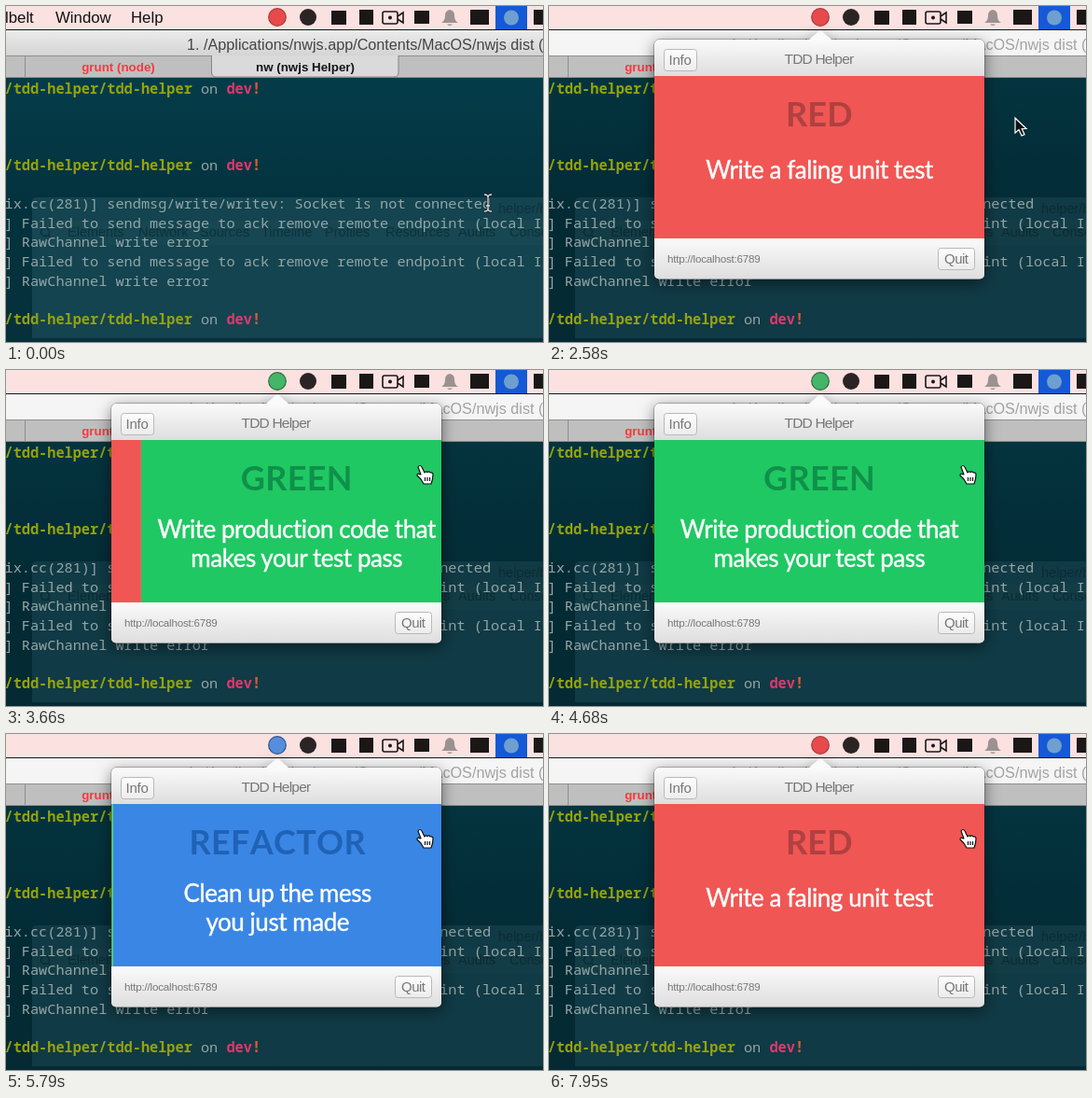
An HTML page that plays this animation: 576x360 px, repeating every 8000 ms.

```html
<!DOCTYPE html>
<html lang="en">
<head>
<meta charset="utf-8">
<title>TDD Helper</title>
<style>
html, body { margin: 0; width: 100%; height: 100%; overflow: hidden; background: #05343f; }
#stage { display: block; width: 576px; height: 360px; font-family: "Liberation Sans", Arial, sans-serif; }
#stage text { white-space: pre; }
.menu { font-size: 16.8px; fill: #111; }
.tab { font-size: 13.35px; font-weight: bold; text-anchor: middle; }
.term { font: 500 15.25px "Noto Sans Mono", "DejaVu Sans Mono", monospace; fill: #94a5a5; }
.path { fill: #95a30c; font-weight: bold; }
.branch { fill: #e0386c; font-weight: bold; }
.bang { fill: #dc5c2f; font-weight: bold; }
.ghost { font-size: 14.5px; fill: #0d323c; }
.ui { fill: #777; }
.button { fill: url(#buttonFill); stroke: #b9b9b9; }
.card { font-family: Lato, sans-serif; text-anchor: middle; }
.body { font-size: 26px; letter-spacing: -.45px; fill: #fff; stroke: #fff; stroke-width: .4; }
.head { font-size: 36px; font-weight: bold; font-kerning: none; letter-spacing: .3px; }
</style>
</head>
<body>
<svg id="stage" viewBox="0 0 576 360" xmlns="http://www.w3.org/2000/svg">
  <defs>
    <linearGradient id="termFill" x2="0" y2="1">
      <stop stop-color="#053c49"/><stop offset=".5" stop-color="#03323e"/><stop offset="1" stop-color="#06313b"/>
    </linearGradient>
    <linearGradient id="titleFill" x2="0" y2="1">
      <stop stop-color="#ebebeb"/><stop offset="1" stop-color="#d4d4d4"/>
    </linearGradient>
    <linearGradient id="barFill" x2="0" y2="1">
      <stop stop-color="#fafafa"/><stop offset="1" stop-color="#dedede"/>
    </linearGradient>
    <linearGradient id="buttonFill" x2="0" y2="1">
      <stop stop-color="#fdfdfd"/><stop offset="1" stop-color="#ececec"/>
    </linearGradient>
    <filter id="shadow" x="-20%" y="-20%" width="140%" height="140%">
      <feDropShadow dx="0" dy="4" stdDeviation="8" flood-color="#000" flood-opacity=".5"/>
    </filter>
    <clipPath id="popupClip"><rect x="113" y="36" width="354" height="256.500" rx="5"/></clipPath>
  </defs>

  <!-- terminal -->
  <rect y="77" width="576" height="283" fill="url(#termFill)"/>
  <path d="M28 356V210q0-5 5-5H576V356Z" fill="#134450"/>
  <path d="M28 230H576V256H28Z" fill="#164752"/>
  <g id="ghosts" class="ghost">
    <circle cx="42" cy="242" r="4.5" fill="none" stroke="#0d323c" stroke-width="1.5"/>
    <path d="M45 245l4 4" stroke="#0d323c" stroke-width="1.5"/>
    <text x="528" y="222">helper/b</text>
  </g>
  <rect id="dim" y="77" width="576" height="283" opacity=".14"/>
  <g id="lines" class="term"></g>

  <!-- window frame -->
  <rect id="titleBar" y="26" width="576" height="27" fill="url(#titleFill)"/>
  <text id="title" x="194" y="47" font-size="16.2">1. /Applications/nwjs.app/Contents/MacOS/nwjs dist (</text>
  <rect y="53" width="576" height="24" fill="#bfbfbf"/>
  <path d="M0 53.5H221M421 53.5H576M20.5 53V77M0 76.5H576" stroke="#8f8f8f"/>
  <path d="M221 53V71q0 5 5 5H416q5 0 5-5V53Z" fill="#dadada"/>
  <path d="M220.5 53V71q0 5 5 5H416q5 0 5-5V53" fill="none" stroke="#858585"/>
  <text class="tab" x="120.5" y="69.5" fill="#f5393f">grunt (node)</text>
  <text class="tab" x="321" y="69.5" fill="#151515">nw (nwjs Helper)</text>

  <!-- menu bar -->
  <rect width="576" height="25" fill="#fce1e1"/>
  <rect y="25" width="576" height="1" fill="#1c1416"/>
  <g id="menu" class="menu">
    <text x="-1" y="18">lbelt</text>
    <text x="53" y="18">Window</text>
    <text x="134" y="18">Help</text>
  </g>
  <circle id="status" cx="291" cy="12" r="9.3" stroke-width="1.2"/>
  <circle cx="324" cy="12" r="9" fill="#2b2424"/>
  <g fill="#1b1717">
    <rect x="349" y="5" width="16" height="15"/>
    <rect x="379" y="4" width="15" height="16"/>
    <rect x="438" y="5" width="16" height="14"/>
    <rect x="498" y="4" width="20" height="16"/>
    <rect x="566" y="4" width="16" height="16"/>
  </g>
  <g fill="none" stroke="#1b1717" stroke-width="1.6">
    <rect x="404" y="6" width="16" height="13" rx="2"/>
    <path d="M420 11l6-4V18l-6-4"/>
  </g>
  <circle cx="412" cy="12.500" r="2" fill="#1b1717"/>
  <path d="M467 18q4-2 4-8q0-5 5-6q5 1 5 6q0 6 4 8ZM473 19.500H479q-3 3-6 0Z" fill="#9c9191"/>
  <rect x="525" width="34" height="25" fill="#1559d6"/>
  <circle cx="542" cy="12.500" r="8" fill="#6f9fce"/>

  <!-- popup -->
  <g id="popup">
    <g filter="url(#shadow)">
      <rect x="113" y="36" width="354" height="256.500" rx="5" fill="#e8e8e8" stroke="#000" stroke-opacity=".45"/>
      <path d="M278 37L291 26L304 37Z" fill="#fafafa"/>
    </g>
    <g clip-path="url(#popupClip)">
      <rect x="113" y="36" width="354" height="39" fill="url(#barFill)"/>
      <svg id="deck" x="113" y="75" width="354" height="174"></svg>
      <rect x="113" y="249" width="354" height="44" fill="url(#barFill)"/>
    </g>
    <rect class="button" x="123.500" y="46.500" width="35" height="23" rx="3"/>
    <rect class="button" x="417.500" y="259.500" width="39" height="23" rx="3"/>
    <g class="ui">
      <text x="128.500" y="63" font-size="15" letter-spacing="-.2">Info</text>
      <text x="424" y="276" font-size="15" letter-spacing="-.5">Quit</text>
      <text x="252.500" y="62" font-size="15.5" letter-spacing="-.8">TDD Helper</text>
      <text x="127" y="274.500" font-size="11.6" letter-spacing="-.2">http://localhost:6789</text>
    </g>
  </g>

  <!-- pointers, hot spot at 0,0 -->
  <g id="beam" fill="none">
    <path d="M-4-9q4 0 4 3V6q0 3-4 3M4-9q-4 0-4 3V6q0 3 4 3M-2 3H2" stroke="#222" stroke-width="3"/>
    <path d="M-4-9q4 0 4 3V6q0 3-4 3M4-9q-4 0-4 3V6q0 3 4 3M-2 3H2" stroke="#ddd" stroke-width="1.3"/>
  </g>
  <path id="arrow" d="M0 0V16L4 12.500L7 19L10 17.700L7.200 11.500H12Z" fill="#111" stroke="#fff" stroke-width="1.2"/>
  <path id="hand" d="M-4 1q2-3 4 0L3 7q1-2 3-.500q2-1.500 3 .500q3-.500 3 2L11.500 14L10 19H2L-1 14L-5 10q0-3 3-1L-1 9ZM3.500 12V16M6 12V16M8.500 12V16"
    fill="#fff" stroke="#111" stroke-width="1.2" stroke-linejoin="round"/>
</svg>

<script>
const LOOP = 8000, WIDTH = 354, SLIDE = 600, TEXT_LAG = 0.68, OPEN = 1080;
const $ = id => document.getElementById(id);

const red = { fill: "#f05654", dot: "#e84a4c", rim: "#a83c3a", ink: "#b04041", head: "RED", body: ["Write a faling unit test"], y: 110 };
const green = { fill: "#1fc863", dot: "#45b667", rim: "#2c6e42", ink: "#10904a", head: "GREEN", body: ["Write production code that", "makes your test pass"], y: 105 };
const blue = { fill: "#3a86e4", dot: "#558fdc", rim: "#2c5690", ink: "#2062b6", head: "REFACTOR", body: ["Clean up the mess", "you just made"], y: 105 };
const cards = [red, green, blue];

// icon: when the status dot changes, at: when the slide begins
const slides = [
  { icon: 3120, at: 3187, from: red, to: green },
  { icon: 5130, at: 5222, from: green, to: blue },
  { icon: 7290, at: 7355, from: blue, to: red }
];

// start, end, start point, control point, end point
const moves = [
  [270, 1020, [517, 211], [400, 70], [293, 10]],
  [1680, 2460, [293, 10], [640, 20], [500, 120]],
  [2580, 3060, [500, 120], [470, 122], [446, 103]]
];

const prompt = '<tspan class="path">/tdd-helper/tdd-helper</tspan> on <tspan class="branch">dev</tspan><tspan class="bang">!</tspan>';
const failed = "] Failed to send message to ack remove remote endpoint (local I";
const broken = "] RawChannel write error";
const rows = [[0, prompt], [4, prompt],
  [6, "ix.cc(281)] sendmsg/write/writev: Socket is not connected"],
  [7, failed], [8, broken], [9, failed], [10, broken], [12, prompt]];
$("lines").innerHTML = rows.map(([n, s]) => `<text x="-1.5" y="${93.5 + n * 20.6}">${s}</text>`).join("");

const panes = { Elements: 66, Network: 142, Sources: 208, Timeline: 274, Profiles: 342, Resources: 407, Audits: 485, Console: 540 };
$("ghosts").innerHTML += Object.entries(panes).map(([s, x]) => `<text x="${x}" y="247">${s}</text>`).join("");

$("deck").innerHTML = cards.map(c => `<svg class="card" width="${WIDTH}" height="174">
  <rect width="${WIDTH}" height="174" fill="${c.fill}"/><g>
  <text class="head" x="177" y="54" fill="${c.ink}">${c.head}</text>
  ${c.body.map((s, i) => `<text class="body" x="177" y="${c.y + i * 31}">${s}</text>`).join("")}</g></svg>`).join("");
document.querySelectorAll(".card").forEach((el, i) => {
  cards[i].el = el;
  cards[i].copy = el.querySelector("g");
});

const clamp = v => Math.min(1, Math.max(0, v));
const smooth = v => v * v * (3 - 2 * v);

// CSS ease-in-out: cubic-bezier(.42, 0, .58, 1)
function easeInOut(x) {
  let lo = 0, hi = 1;
  for (let i = 0; i < 20; i++) {
    const s = (lo + hi) / 2, r = 1 - s;
    if (3 * r * r * s * .42 + 3 * r * s * s * .58 + s * s * s < x) lo = s; else hi = s;
  }
  return smooth((lo + hi) / 2);
}

function show(el, on) { el.style.display = on ? "" : "none"; }

function place(card, x, lag) {
  show(card.el, true);
  card.el.setAttribute("x", x);
  card.copy.setAttribute("transform", `translate(${x * (lag - 1)} 0)`);
}

function drawCards(t) {
  const now = slides.filter(s => t >= s.at).pop();
  cards.forEach(c => show(c.el, false));
  if (!now) return place(red, 0, 1);
  const p = easeInOut(clamp((t - now.at) / SLIDE));
  const gap = WIDTH * (1 - p);
  if (gap > .1) place(now.from, gap - WIDTH, 1);
  place(now.to, gap > .1 ? gap : 0, TEXT_LAG);
}

function drawStatus(t) {
  const last = slides.filter(s => t >= s.icon).pop();
  const card = last ? last.to : red;
  $("status").setAttribute("fill", card.dot);
  $("status").setAttribute("stroke", card.rim);
}

function drawPointer(t) {
  const [start, end, a, b, c] = moves.filter(m => t >= m[0]).pop() || moves[0];
  const p = smooth(clamp((t - start) / (end - start))), q = 1 - p;
  const [x, y] = [0, 1].map(i => q * q * a[i] + 2 * p * q * b[i] + p * p * c[i]);
  const overCard = t > OPEN && x > 113 && x < 467 && y > 75 && y < 249;
  const kind = overCard ? "hand" : t < OPEN && y > 77 ? "beam" : "arrow";
  for (const id of ["hand", "beam", "arrow"]) show($(id), id === kind);
  $(kind).setAttribute("transform", `translate(${x} ${y})`);
}

function draw(t) {
  const open = t >= OPEN;
  show($("popup"), open);
  show($("dim"), open);
  show($("menu"), !open);
  $("titleBar").setAttribute("fill", open ? "#f5f5f5" : "url(#titleFill)");
  $("title").setAttribute("fill", open ? "#a2a2a2" : "#444");
  drawStatus(t);
  drawCards(t);
  drawPointer(t);
}

const began = performance.now();
function tick() {
  draw((performance.now() - began) % LOOP);
  requestAnimationFrame(tick);
}
tick();
</script>
</body>
</html>
```
